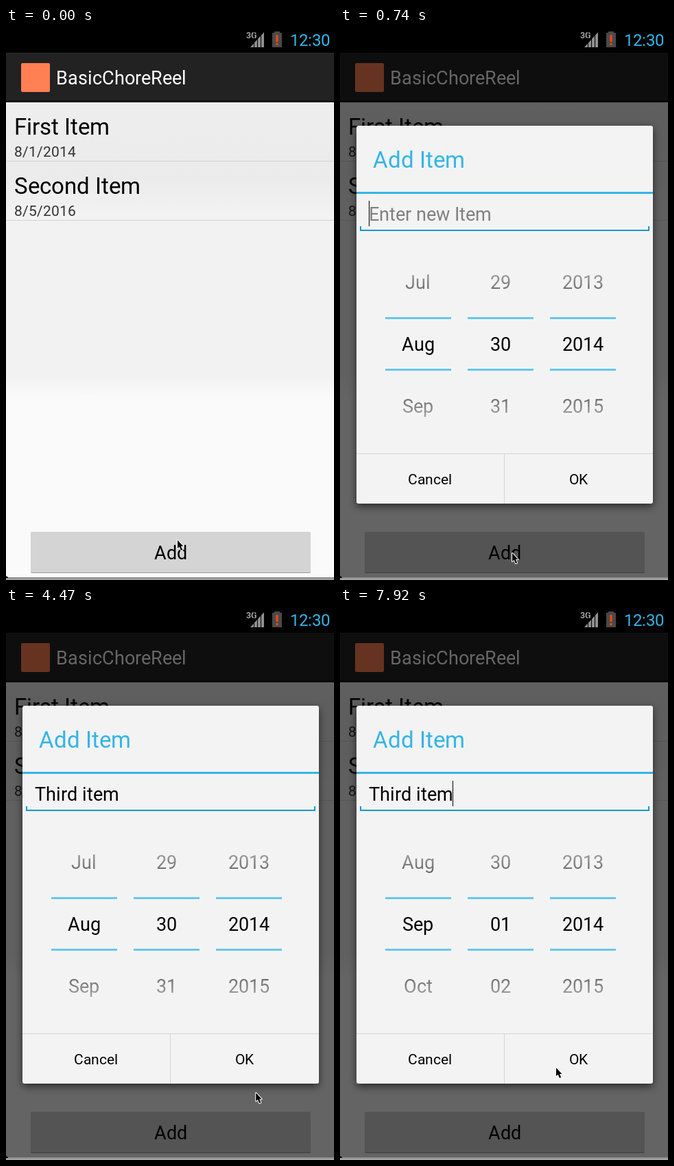
Write an HTML page with a canvas that moves like this. It is 478 px wide and 802 px high and loops after 8000 ms.

```html
<!DOCTYPE html>
<html lang="en">
<head>
<meta charset="utf-8">
<title>To-do list</title>
<style>
html, body { margin: 0; width: 100%; height: 100%; overflow: hidden; background: #000; }
canvas { display: block; }
</style>
</head>
<body>
<canvas id="stage" width="478" height="802"></canvas>
<script>
const ctx = document.getElementById('stage').getContext('2d');
const LOOP = 8000;
const BLUE = '#33b5e5';
const INPUT = 'Third item';
const MONTHS = 'Jan Feb Mar Apr May Jun Jul Aug Sep Oct Nov Dec'.split(' ');
const PRESS = 300, RELEASE = 450, OPEN = 590, OPENED = 740;
const TYPE_START = 1340, TYPE_INTERVAL = 264;
const ROW = 90;

// [time, x, y] of the pointer tip
const POINTER = [
  [0, 250, 744], [270, 251, 763], [4020, 251, 763], [4620, 402, 685],
  [5070, 359, 560], [5970, 259, 542], [6420, 251, 525], [7020, 240, 342],
  [7470, 309, 675], [7920, 315, 668]];

function rect(x, y, w, h, color) {
  ctx.fillStyle = color;
  ctx.fillRect(x, y, w, h);
}

function roundRect(x, y, w, h, r, color) {
  ctx.fillStyle = color;
  ctx.beginPath();
  ctx.roundRect(x, y, w, h, r);
  ctx.fill();
}

function polygon(points, color) {
  ctx.fillStyle = color;
  ctx.beginPath();
  points.forEach(([x, y]) => ctx.lineTo(x, y));
  ctx.closePath();
  ctx.fill();
}

// Glyphs advance by whole pixels, as on the device; returns the text width
function text(str, x, y, size, color = '#000', align = 0, weight = 400) {
  ctx.font = `${weight} ${size}px Roboto, sans-serif`;
  ctx.fillStyle = color;
  const advances = [...str].map(ch => Math.round(ctx.measureText(ch).width));
  const width = advances.reduce((sum, advance) => sum + advance, 0);
  let left = Math.floor(x - width * align);
  [...str].forEach((ch, i) => {
    ctx.fillText(ch, left, y);
    left += advances[i];
  });
  return width;
}

const centered = (str, x, y, size, color) => text(str, x, y, size, color, 0.5);

function verticalGradient(y0, y1, stops) {
  const g = ctx.createLinearGradient(0, y0, 0, y1);
  stops.forEach(([y, color]) => g.addColorStop((y - y0) / (y1 - y0), color));
  return g;
}

const listFill = verticalGradient(108, 798, [[108, '#eeeeee'], [215, '#ebebeb'],
  [270, '#f2f2f2'], [505, '#f2f2f2'], [535, '#fafafa'], [798, '#fafafa']]);
const wheelFill = verticalGradient(315, 604, [[315, 'rgba(0,0,0,0)'],
  [436, '#000'], [483, '#000'], [604, 'rgba(0,0,0,0)']]);
const edgeFill = verticalGradient(798, 802, [[798, '#858585'], [802, '#adadad']]);

// The pointer moves in 150 ms steps
function pointerAt(t) {
  const time = Math.max(0, Math.floor((t - 120) / 150) * 150 + 120);
  const next = POINTER.findIndex(key => key[0] > time);
  if (next < 0) return POINTER[POINTER.length - 1].slice(1);
  const [t0, x0, y0] = POINTER[next - 1];
  const [t1, x1, y1] = POINTER[next];
  const k = (time - t0) / (t1 - t0);
  return [x0 + (x1 - x0) * k, y0 + (y1 - y0) * k];
}

function drawStatusBar() {
  rect(0, 0, 478, 36, '#000');
  text('3G', 350, 15, 12.5, '#a0a0a0', 0, 700);
  polygon([[356, 28], [377, 5], [377, 28]], '#8f8f8f');
  for (let x = 361; x < 377; x += 5) rect(x, 4, 1, 24, '#000');
  rect(391, 5, 8, 3, '#4a4a4a');
  rect(388, 7, 14, 21, '#4a4a4a');
  rect(393.5, 10, 3, 10, '#ff4411');
  rect(393.5, 22, 3, 3, '#ff4411');
  text('12:30', 472, 26, 24, BLUE, 1);
}

function drawListItem(y, title, date) {
  text(title, 12, y + 47, 33);
  text(date, 12, y + 79, 21, '#333');
  rect(0, y + 85, 478, 1, '#d3d3d3');
}

function drawAddButton(t) {
  const pressed = t >= PRESS && t < RELEASE;
  if (pressed) roundRect(30, 727, 420, 70, 4, 'rgba(51,181,229,.35)');
  else if (t >= RELEASE && t < OPEN) rect(30, 727, 420, 70, '#fff');
  roundRect(36, 733, 408, 59, 2, '#9c9c9c');
  roundRect(36, 732, 408, 59, 2, pressed ? '#a5cfde' : '#d4d4d4');
  centered('Add', 240, 772, 27);
}

function drawApp(t) {
  rect(0, 36, 478, 72, '#222');
  rect(0, 36, 478, 1, '#2d2d2d');
  rect(0, 105, 478, 3, '#141414');
  roundRect(22, 51, 42, 42, 2, '#ff8053');
  text('BasicChoreReel', 73, 82, 27, '#fff');
  rect(0, 108, 478, 690, listFill);
  drawListItem(108, 'First Item', '8/1/2014');
  drawListItem(194, 'Second Item', '8/5/2016');
  drawAddButton(t);
}

function drawWheel(center, label, shift = 0) {
  for (let i = -2; i <= 2; i++) {
    const y = 469 + i * ROW - shift;
    if (y > 315 && y < 620) centered(label(i), center, y, 27, wheelFill);
  }
  [420, 495].forEach(y => rect(center - 48, y, 96, 3, '#66c8ec'));
}

// Dragging the day wheel rolls the whole date forward
function drawDatePicker(t, pointerY) {
  const dragged = t < 6270 ? 0
    : t < 7170 ? Math.max(0, 515 - pointerY) : 2 * ROW;
  const steps = Math.round(dragged / ROW);
  const date = new Date(2014, 7, 30 + steps);
  const month = date.getMonth(), year = date.getFullYear();
  const monthLength = new Date(year, month + 1, 0).getDate();
  const day = i => (date.getDate() - 1 + i + monthLength) % monthLength + 1;
  drawWheel(114, i => MONTHS[(month + i + 12) % 12]);
  drawWheel(234, i => String(day(i)).padStart(2, '0'), dragged - steps * ROW);
  drawWheel(354, i => String(year + i));
}

function drawInput(t) {
  const count = Math.max(0, Math.floor((t - TYPE_START) / TYPE_INTERVAL) + 1);
  const typed = INPUT.slice(0, count);
  if (!typed) text('Enter new Item', 42, 280, 27, '#808080');
  const width = text(typed, 42, 280, 27);
  const lastEdit = t < TYPE_START ? OPEN
    : Math.min(t, TYPE_START + (INPUT.length - 1) * TYPE_INTERVAL - 46);
  if ((t - lastEdit) % 1000 < 450 + 50 * (count > 0)) {
    rect(42 + Math.max(0, width - 1), 251, 1, 37, '#000');
  }
  rect(29, 293, 422, 2, '#1798cf');
  [29, 449].forEach(x => rect(x, 288, 2, 6, '#1798cf'));
}

function drawDialog(t, pointerY) {
  ctx.save();
  ctx.shadowColor = 'rgba(0,0,0,.6)';
  ctx.shadowBlur = 12;
  ctx.shadowOffsetY = 4;
  roundRect(24, 142, 432, 549, 3, '#f3f3f3');
  ctx.restore();
  text('Add Item', 48, 203, 33, BLUE);
  rect(24, 238, 432, 3, BLUE);
  drawInput(t);
  drawDatePicker(t, pointerY);
  rect(24, 618, 432, 1, '#d5d5d5');
  rect(239, 618, 1, 73, '#d5d5d5');
  centered('Cancel', 131, 663, 21);
  centered('OK', 348, 663, 21);
}

function drawPointer(x, y) {
  ctx.save();
  ctx.translate(x, y);
  polygon([[0, 0], [0, 12], [2.7, 9.7], [5, 15], [7.2, 14], [5, 9], [8.5, 9]], '#000');
  ctx.lineWidth = 2;
  ctx.lineJoin = 'round';
  ctx.strokeStyle = '#fff';
  ctx.stroke();
  ctx.fill();
  ctx.restore();
}

function draw(t) {
  const [x, y] = pointerAt(t);
  drawStatusBar();
  drawApp(t);
  if (t >= OPEN) {
    const shown = t < OPENED ? 0.5 : 1;
    rect(0, 36, 478, 762, `rgba(0,0,0,${0.6 * shown})`);
    ctx.save();
    ctx.globalAlpha = shown;
    drawDialog(t, y);
    ctx.restore();
  }
  rect(0, 798, 478, 4, edgeFill);
  polygon([[0, 796], [3, 798], [3, 799], [0, 799]], '#000');
  drawPointer(x, y);
}

function tick() {
  draw(performance.now() % LOOP);
  requestAnimationFrame(tick);
}
tick();
</script>
</body>
</html>
```
